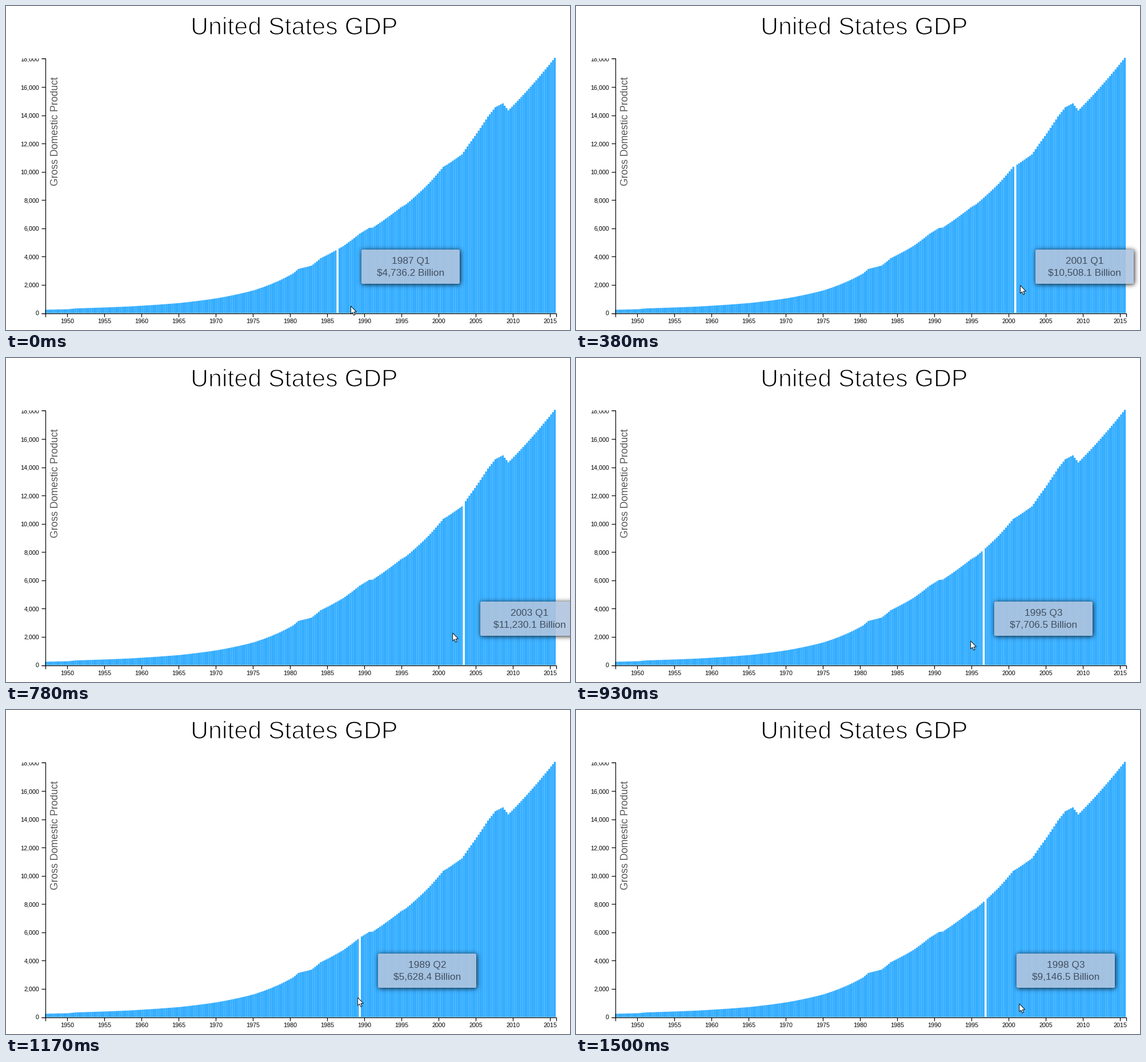
These frames come from a looping animation (987x568 px, 1580 ms). A matplotlib script:

```python
import math

import matplotlib.pyplot as plt
import numpy as np
from matplotlib.animation import FuncAnimation
from matplotlib.collections import LineCollection, PolyCollection
from matplotlib.patches import Polygon, Rectangle
from matplotlib.patheffects import Normal, Stroke

W, H, DPI = 987, 568, 64
TICK_MS, LOOP_MS, STEP_MS, LEAD_MS = 10, 1580, 79, 18
X0, Y0 = 68.3, 538.5            # chart origin
BAR_W, PX_PER_BILLION = 3.25, 0.02478
BLUE = "#33adff"
TIP_W, TIP_H, TIP_TOP, PAD = 172, 60, 427, 20

plt.rcParams["font.family"] = "Liberation Sans"


def px(size):
    """Pixels to points."""
    return size * 72 / DPI


# Turning points of the series; growth between them is exponential.
TURNS = {
    1947: 243.1, 1950: 281.2, 1951: 336.6, 1958: 468.4, 1965: 719.2, 1970: 1053.5,
    1975: 1619.6, 1978: 2208.7, 1980.25: 2799.9, 1981: 3131.8, 1982.75: 3360.0,
    1984: 3890.2, 1987: 4736.2, 1989.25: 5628.4, 1990.5: 6029.5, 1991: 6054.9,
    1994.75: 7476.7, 1995.5: 7706.5, 1998.5: 9146.5, 2000.5: 10357.4, 2001: 10508.1,
    2003: 11230.1, 2004: 11988.4, 2006.5: 13908.5, 2007.5: 14569.7, 2008.5: 14843.0,
    2009.25: 14340.4, 2015.5: 18064.7}
quarters = 1947 + np.arange(275) / 4
gdp = np.exp(np.interp(quarters, list(TURNS), np.log(list(TURNS.values()))))

# Bars under the tooltip and under the white marker that trails it.
KEYS = [0, 2, 5, 8, 9, 12, 15, 16, 19, 20]
TIP_BAR = [160, 191, 216, 238, 239, 194, 169, 167, 206, 245]
GAP_BAR = [157, 182, 215, 237, 239, 198, 169, 167, 199, 232]
MOUSE_AHEAD = 0.3               # steps
ARROW = np.array([(0, 0), (0, 14), (3.1, 11.2), (5.2, 16.2),
                  (7.5, 15.2), (5.4, 10.4), (9.8, 10.2)])

fig = plt.figure(figsize=(W / DPI, H / DPI), dpi=DPI, facecolor="white")
ax = fig.add_axes([0, 0, 1, 1])
ax.axis("off")


def bar_x(index):
    return X0 + index * BAR_W


def value_y(value):
    return Y0 - value * PX_PER_BILLION


def draw_bars():
    quads = []
    for i, value in enumerate(gdp):
        left, right, top = bar_x(i), bar_x(i + 1), value_y(value)
        quads.append([(left, Y0), (left, top), (right, top), (right, Y0)])
    ax.add_collection(PolyCollection(quads, facecolors=BLUE, edgecolors="none",
                                     snap=False, zorder=1))


def draw_axes():
    right, top = 962.5, 91.5
    lines = [[(62, top), (68.5, top), (68.5, Y0), (62, Y0)],
             [(68.5, 545), (68.5, Y0), (right, Y0), (right, 545)]]
    small = dict(fontsize=px(10.8), color="black", va="baseline", zorder=3)
    for value in range(0, 18001, 2000):
        y = value_y(value)
        lines.append([(62, y), (68.5, y)])
        ax.text(58, y + 4, f"{value:,}", ha="right", **small)
    for year in range(1950, 2016, 5):
        x = bar_x((year - 1947) * 4)
        lines.append([(x, Y0), (x, 545)])
        ax.text(x, 556, str(year), ha="center", **small)
    ax.add_collection(LineCollection(lines, colors="black", linewidths=px(1.2), zorder=4))
    # The top label is cut off by the edge of the chart.
    ax.add_patch(Rectangle((18, 78), 43, 13.5, facecolor="white", edgecolor="none", zorder=4))


def draw_titles():
    # A white rim on the glyphs makes the heading light.
    thin = [Normal(), Stroke(linewidth=px(1.4), foreground="white")]
    ax.text(504, 50, "United States GDP", fontsize=px(42.9), color="black",
            ha="center", va="baseline", path_effects=thin, zorder=3)
    ax.text(91, 219.5, "Gross Domestic Product", fontsize=px(17.6), color="#555555",
            ha="center", va="baseline", rotation=90, rotation_mode="anchor", zorder=3)


def tooltip_image():
    """Translucent rounded box with a blurred shadow around it."""
    x = np.arange(TIP_W + 2 * PAD) + 0.5 - PAD
    y = np.arange(TIP_H + 2 * PAD) + 0.5 - PAD

    def blur(pos, size, sigma=4.2, shift=1):
        k = sigma * math.sqrt(2)
        return np.array([0.5 * (math.erf((p - shift) / k) - math.erf((p - shift - size) / k))
                         for p in pos])

    def inset(pos, size, radius=2):
        return np.maximum(np.abs(pos - size / 2) - size / 2 + radius, 0)

    shadow = 0.9 * np.outer(blur(y, TIP_H), blur(x, TIP_W))
    dist = np.hypot(inset(y, TIP_H)[:, None], inset(x, TIP_W)[None, :]) - 2
    box = np.clip(0.5 - dist, 0, 1)
    image = np.empty(box.shape + (4,))
    image[..., :3] = box[..., None] * np.array([176, 196, 222]) / 255
    image[..., 3] = box * 0.9 + (1 - box) * shadow
    return image


draw_bars()
draw_axes()
draw_titles()
gap = ax.add_patch(Rectangle((0, 0), 3.5, 0, facecolor="white", edgecolor="none",
                             snap=False, zorder=2))
tooltip = ax.imshow(tooltip_image(), extent=(0, 1, 1, 0), aspect="auto",
                    interpolation="nearest", zorder=5)
tip_style = dict(fontsize=px(17.2), color="#435060", ha="center", va="baseline",
                 zorder=6, clip_on=True)
tip_date = ax.text(0, 452, "", **tip_style)
tip_value = ax.text(0, 473, "", **tip_style)
arrow = ax.add_patch(Polygon(ARROW, closed=True, facecolor="white", edgecolor="black",
                             linewidth=px(0.9), joinstyle="miter", zorder=7))
ax.set_xlim(0, W)
ax.set_ylim(H, 0)


def update(frame):
    last = LOOP_MS // STEP_MS - 1
    step = min((frame * TICK_MS + LEAD_MS) // STEP_MS, last)

    gap_bar = round(np.interp(step, KEYS, GAP_BAR))
    top = value_y(gdp[gap_bar]) - 5
    gap.set_xy((bar_x(gap_bar) - 0.1, top))
    gap.set_height(538 - top)

    bar = round(np.interp(step, KEYS, TIP_BAR))
    left = round(101.5 + bar * BAR_W)
    tooltip.set_extent((left - PAD, left + TIP_W + PAD,
                        TIP_TOP + TIP_H + PAD, TIP_TOP - PAD))
    ax.set_xlim(0, W)
    ax.set_ylim(H, 0)
    tip_date.set_text(f"{1947 + bar // 4} Q{bar % 4 + 1}")
    tip_value.set_text(rf"\${gdp[bar]:,.1f} Billion")
    for text in (tip_date, tip_value):
        text.set_x(left + TIP_W / 2)

    mouse_x = bar_x(np.interp(step + MOUSE_AHEAD, KEYS, TIP_BAR))
    mouse_y = np.interp(step, [0, 8, 12, last], [526, 468, 496, 515])
    arrow.set_xy(ARROW + (mouse_x, mouse_y))
    return gap, tooltip, tip_date, tip_value, arrow


anim = FuncAnimation(fig, update, frames=LOOP_MS // TICK_MS, interval=TICK_MS,
                     repeat=True, repeat_delay=0, blit=False)
plt.show()
```
